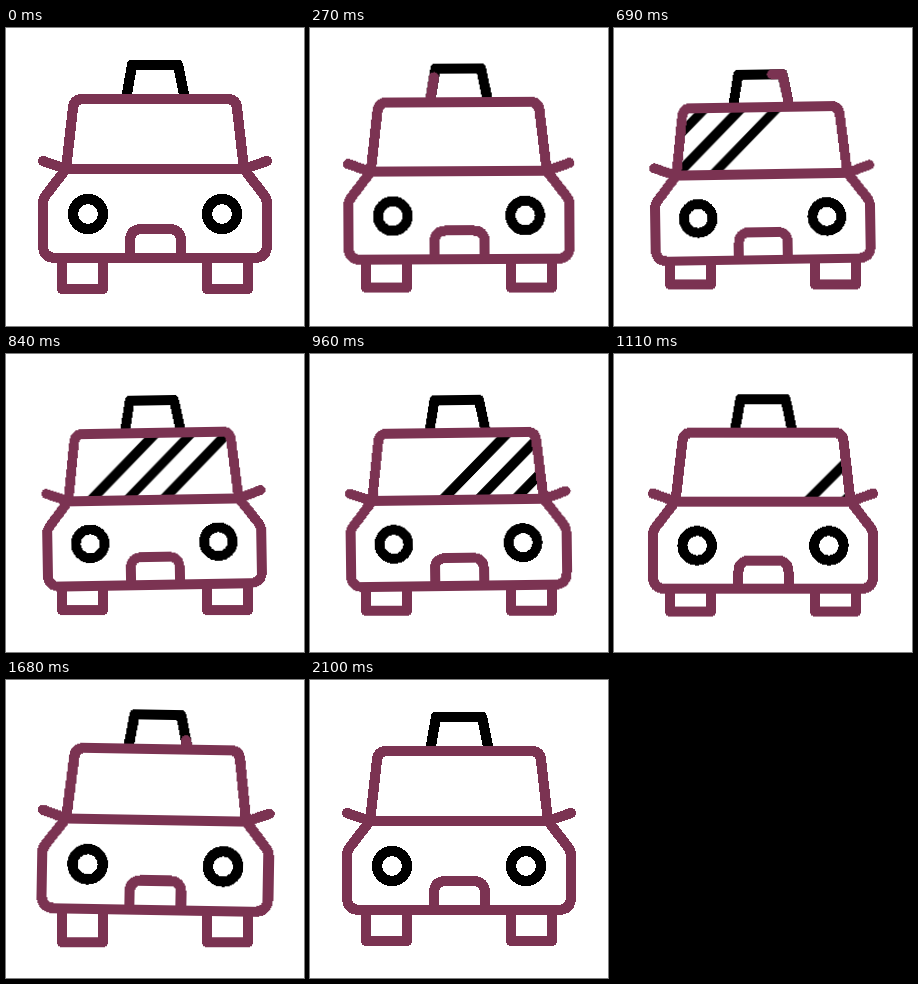
Animation of 298x298 px, one loop 2.25 s. Source, as an HTML page:

```html
<!DOCTYPE html>
<html lang="en">
<head>
<meta charset="utf-8">
<title>Taxi</title>
<style>
  html, body { margin: 0; height: 100%; overflow: hidden; background: #fff; }
  svg { display: block; width: 100vw; height: 100vh; shape-rendering: crispEdges; }
  path, line, circle { fill: none; stroke: #7b3352; stroke-width: 10.2; stroke-linecap: round; stroke-linejoin: round; }
  .dark { stroke: #000; }
  .shell { fill: #fff; }

  .car, .wheels, .sweep, .glint { animation: 2250ms linear infinite; }
  .car { animation-name: sway; transform-origin: 149px 149px; }
  .wheels { animation-name: roll; }
  .sweep { animation-name: sweep; }
  .glint { animation-name: glint; }

  @keyframes sway {
    0%, 5.33% { transform: translate(0px, 0px) rotate(0deg) scale(1); animation-timing-function: ease-in-out; }
    21.33% { transform: translate(-.5px, 6.1px) rotate(-.8deg) scale(.968); animation-timing-function: ease-in-out; }
    37.33% { transform: translate(-1.3px, 4.3px) rotate(-1deg) scale(.957); animation-timing-function: ease-in; }
    49.33% { transform: translate(0px, 6.3px) rotate(0deg) scale(.983); animation-timing-function: ease-out; }
    58.67% { transform: translate(1.2px, 3.2px) rotate(.9deg) scale(1.004); animation-timing-function: ease-in-out; }
    74.67% { transform: translate(1px, -1px) rotate(1deg) scale(1.011); animation-timing-function: ease-in-out; }
    93.33%, 100% { transform: translate(0px, 0px) rotate(0deg) scale(1); }
  }

  @keyframes roll {
    0%, 5.33% { transform: translateY(0); animation-timing-function: ease-in-out; }
    21.33% { transform: translateY(-4px); }
    37.33% { transform: translateY(-5px); }
    48% { transform: translateY(-3.6px); animation-timing-function: ease-in-out; }
    58.67% { transform: translateY(.6px); }
    74.67% { transform: translateY(1.2px); animation-timing-function: ease-in-out; }
    93.33%, 100% { transform: translateY(0); }
  }

  /* a coloured stroke grows along the roof sign, then its tail catches up; twice per loop */
  @keyframes sweep {
    0%, 9.33% { opacity: 0; stroke-dasharray: 0 200; stroke-dashoffset: 0; }
    9.34% { opacity: 1; stroke-dasharray: 0 200; stroke-dashoffset: 0; }
    23.1% { opacity: 1; stroke-dasharray: 100 200; stroke-dashoffset: 0; }
    35.5% { opacity: 1; stroke-dasharray: 100 200; stroke-dashoffset: -100; }
    35.51% { opacity: 0; stroke-dasharray: 100 200; stroke-dashoffset: -100; }
    35.52%, 49.7% { opacity: 0; stroke-dasharray: 0 200; stroke-dashoffset: 0; }
    49.71% { opacity: 1; stroke-dasharray: 0 200; stroke-dashoffset: 0; }
    62.67% { opacity: 1; stroke-dasharray: 100 200; stroke-dashoffset: 0; }
    75.2% { opacity: 1; stroke-dasharray: 100 200; stroke-dashoffset: -100; }
    75.21%, 100% { opacity: 0; stroke-dasharray: 100 200; stroke-dashoffset: -100; }
  }

  @keyframes glint {
    0%, 13.07% { transform: translateX(0); }
    58.2%, 100% { transform: translateX(416px); }
  }
</style>
</head>
<body>
<svg viewBox="0 0 298 298">
  <defs>
    <clipPath id="window"><path d="M60 141L67 80Q68 71 77 71H221Q230 71 231 80L238 141Z"/></clipPath>
  </defs>

  <g class="wheels">
    <path d="M56 230V261H97V230M201 230V261H242V230"/>
  </g>

  <g class="car">
    <path class="dark" d="M121 66L126 37H172L178 66"/>
    <path class="sweep" pathLength="100" d="M121 66L126 37H172L178 66"/>

    <g clip-path="url(#window)">
      <g class="glint">
        <line class="dark" x1="-150" y1="150" x2="-60" y2="60"/>
        <line class="dark" x1="-112" y1="150" x2="-22" y2="60"/>
        <line class="dark" x1="-74" y1="150" x2="16" y2="60"/>
      </g>
    </g>

    <path class="shell" d="M60 141L40 167Q37 171 37 176V217Q37 230 50 230H248Q261 230 261 217V176Q261 171 258 167L238 141Z"/>
    <path d="M60 141L67 80Q68 71 77 71H221Q230 71 231 80L238 141"/>
    <path d="M37 133L60 141H238L261 133"/>
    <path d="M124 230V213Q124 201 136 201H163Q175 201 175 213V230"/>
    <circle class="dark" cx="82" cy="186" r="15"/>
    <circle class="dark" cx="216" cy="186" r="15"/>
  </g>
</svg>
</body>
</html>
```
